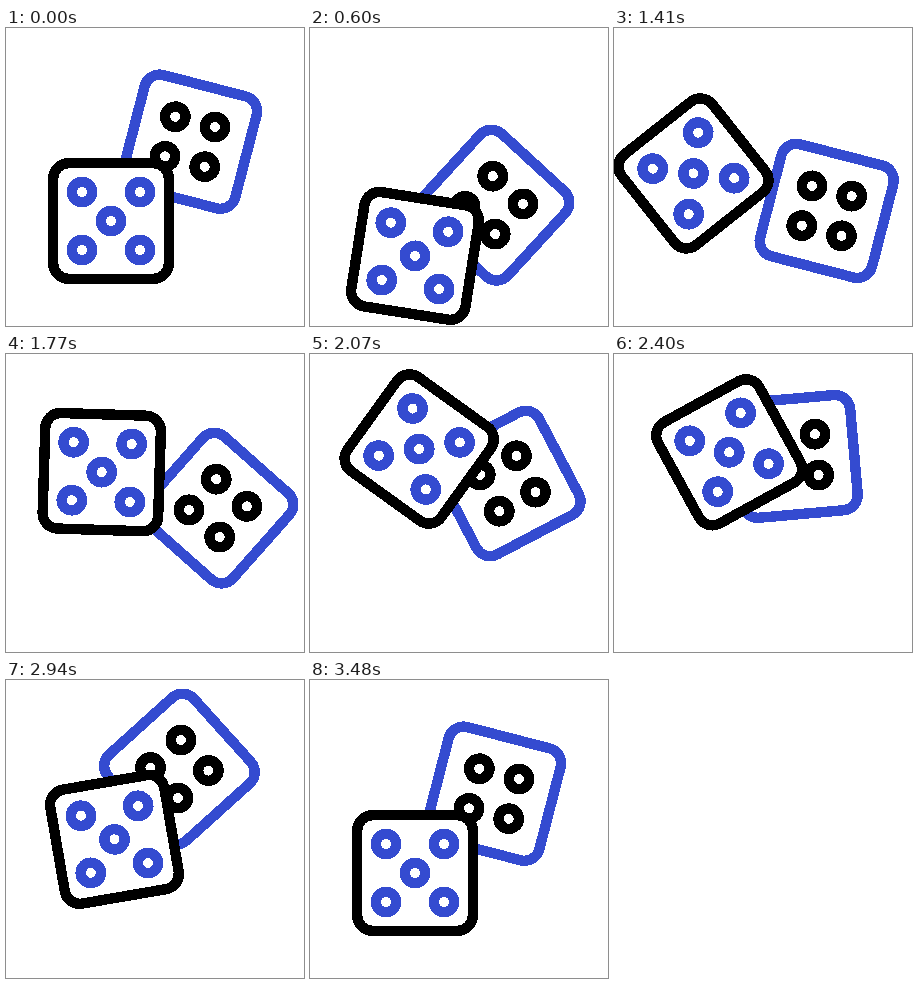
An HTML page without scripts that plays this animation: 298 by 298 pixels, repeating every 3600 ms.

```html
<!DOCTYPE html>
<html lang="en">
<head>
<meta charset="utf-8">
<title>Tumbling dice</title>
<style>
  html, body { margin: 0; width: 100%; height: 100%; overflow: hidden; background: #fff; }
  svg { display: block; width: 100vw; height: 100vh; }
  svg * { shape-rendering: crispEdges; }
  .die { stroke-width: 10.4; animation: 3600ms linear infinite; }
  .front { animation-name: front-move, front-turn; }
  .back { animation-name: back-move, back-turn; }
  .black { stroke: #000; }
  .blue { stroke: #344bd0; }

  @keyframes front-move {
    0%, 4.4% { translate: 105px 193px; }
    16.667% { translate: 105px 228px; }
    39.167% { translate: 79.4px 145.5px; }
    49.167% { translate: 95.7px 118.2px; }
    62.5% { translate: 117.2px 81.2px; }
    66.667% { translate: 115.2px 98.2px; }
    81.667% { translate: 108.5px 159.3px; }
    94.167%, 100% { translate: 105px 193px; }
  }
  @keyframes front-turn {
    0%, 4.4% { rotate: 0deg; }
    16.667% { rotate: 9deg; }
    39.167% { rotate: -38.5deg; }
    49.167% { rotate: 1.7deg; }
    62.5% { rotate: 56deg; }
    66.667% { rotate: 61.2deg; }
    81.667% { rotate: 80.2deg; }
    94.167%, 100% { rotate: 90deg; }
  }
  @keyframes back-move {
    0%, 4.4% { translate: 184px 113.7px; }
    16.667% { translate: 184px 177px; }
    24.4% { translate: 182.5px 217px; }
    30% { translate: 192px 205.5px; }
    43.2% { translate: 221.8px 173px; }
    49.167% { translate: 212px 154.2px; }
    66.667% { translate: 182.4px 102.5px; }
    75% { translate: 168.2px 78px; }
    81.667% { translate: 173.4px 89px; }
    96.667%, 100% { translate: 184px 113.7px; }
  }
  @keyframes back-turn {
    0%, 4.4% { rotate: 14.5deg; }
    16.667% { rotate: 42.5deg; }
    30% { rotate: 79.5deg; }
    49.167% { rotate: 131.5deg; }
    66.667% { rotate: 175deg; }
    81.667% { rotate: 138deg; }
    96.667%, 100% { rotate: 104.5deg; }
  }
</style>
</head>
<body>
<svg viewBox="0 0 298 298" fill="none">
  <defs>
    <rect id="body" x="-57.8" y="-57.8" width="115.6" height="115.6" rx="15.3" fill="#fff"/>
    <circle id="pip" r="10.2"/>
  </defs>

  <g class="die back">
    <use href="#body" class="blue"/>
    <g class="black">
      <use href="#pip" x="-20.5" y="-20.5"/>
      <use href="#pip" x="20.5" y="-20.5"/>
      <use href="#pip" x="-20.5" y="20.5"/>
      <use href="#pip" x="20.5" y="20.5"/>
    </g>
  </g>

  <g class="die front">
    <use href="#body" class="black"/>
    <g class="blue">
      <use href="#pip" x="-29" y="-29"/>
      <use href="#pip" x="29" y="-29"/>
      <use href="#pip"/>
      <use href="#pip" x="-29" y="29"/>
      <use href="#pip" x="29" y="29"/>
    </g>
  </g>
</svg>
</body>
</html>
```
